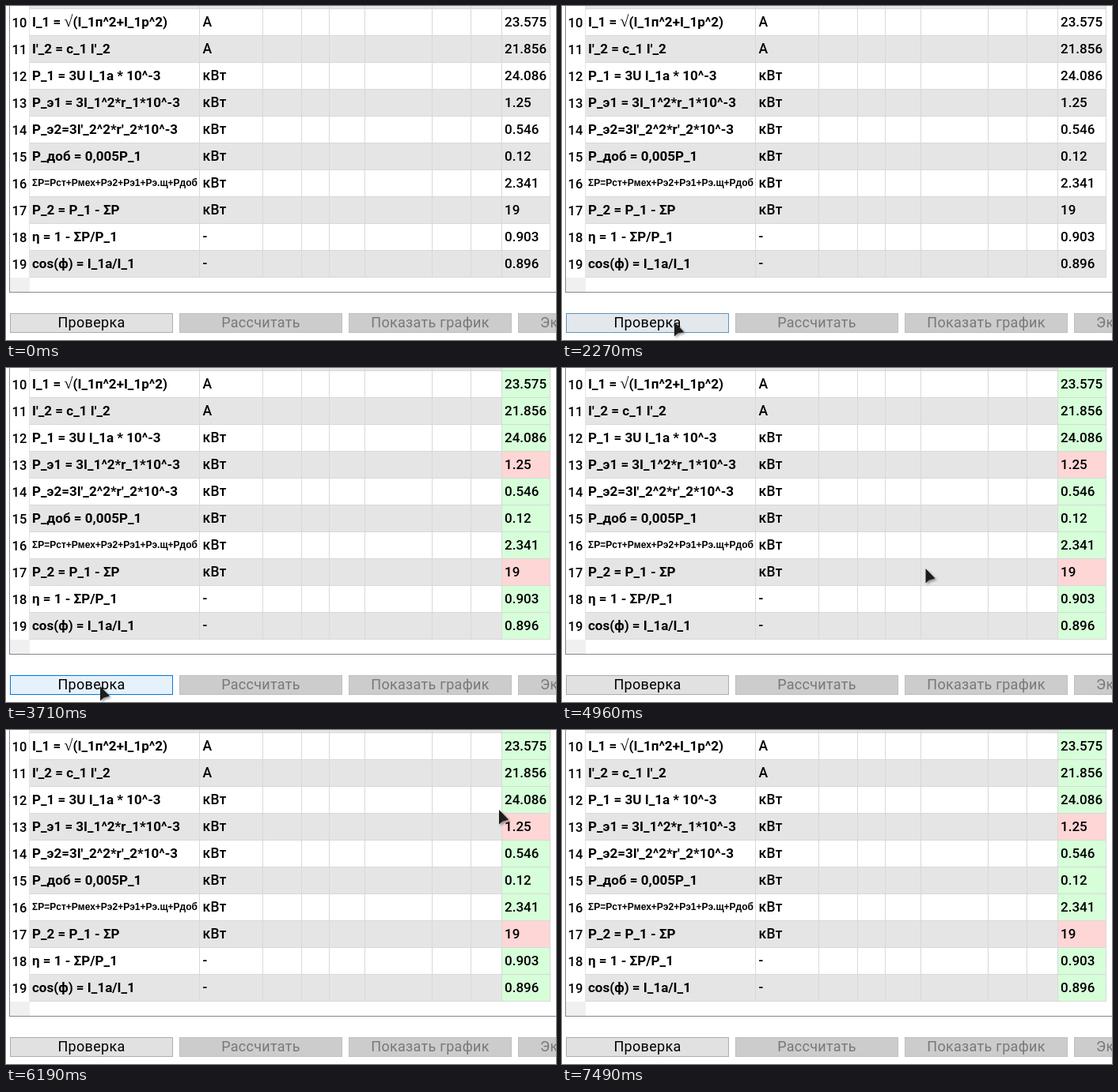
Write an HTML page that moves like this. It is 695 px wide and 423 px high and loops after 8950 ms.

```html
<!DOCTYPE html>
<html lang="ru">
<head>
<meta charset="utf-8">
<style>
html, body { margin: 0; width: 100%; height: 100%; overflow: hidden; background: #fff; }
svg { display: block; width: 695px; height: 423px; }
text { font: 18px Roboto, "Open Sans", sans-serif; white-space: pre; }
.num { font-size: 16.5px; font-weight: 500; text-anchor: middle; }
.formula { font-size: 17px; font-weight: 700; }
.small { font: 700 12px "Liberation Sans", Arial, sans-serif; }
.root { font: 400 20px "Liberation Serif", "DejaVu Sans", serif; }
.unit { font-size: 17.5px; font-weight: 500; letter-spacing: .3px; }
.label { letter-spacing: .3px; }
.value { font-size: 17px; font-weight: 500; }
.mid { text-anchor: middle; }
#cursor { filter: drop-shadow(2px 2px 1.5px rgba(0, 0, 0, .4)); }
</style>
</head>
<body>
<svg id="stage" viewBox="0 0 695 423"></svg>
<script>
const LOOP = 8950, ROW = 34;
const GRID = '#d8d8d8', GREY = '#e5e5e5', GREEN = '#d6ffd9', RED = '#ffd6d6';
const stage = document.getElementById('stage');

function add(tag, attrs, content = '') {
  const el = document.createElementNS('http://www.w3.org/2000/svg', tag);
  for (const key in attrs) el.setAttribute(key, attrs[key]);
  el.innerHTML = content;
  return stage.appendChild(el);
}
const rect = (x, y, width, height, fill) => add('rect', { x, y, width, height, fill });
const text = (x, y, cls, content, fill = '#000') => add('text', { x, y, class: cls, fill }, content);

// Formula, unit, value, wrong answer
const rows = [
  ['I_1 = <tspan class="root">√</tspan>(I_1п^2+I_1р^2)', 'А', '23.575'],
  ["I'_2 = c_1 I'_2", 'А', '21.856'],
  ['P_1 = 3U I_1a * 10^-3', 'кВт', '24.086'],
  ['P_э1 = 3I_1^2*r_1*10^-3', 'кВт', '1.25', true],
  ["P_э2=3I'_2^2*r'_2*10^-3", 'кВт', '0.546'],
  ['P_доб = 0,005P_1', 'кВт', '0.12'],
  ['ΣP=Pст+Pмех+Pэ2+Pэ1+Pэ.щ+Pдоб', 'кВт', '2.341'],
  ['P_2 = P_1 - ΣP', 'кВт', '19', true],
  ['η = 1 - ΣP/P_1', '-', '0.903'],
  ['cos(ϕ) = I_1a/I_1', '-', '0.896'],
];

// Table: fills, then grid, then text
rect(30, 0, 658, 3, GREY);
const marks = [rect(627, 0, 60, 3, GREEN)];
rows.forEach(([, , , wrong], i) => {
  const y = 4 + ROW * i;
  if (i % 2) rect(30, y, 658, ROW, GREY);
  marks.push(rect(627, y, 60, ROW, wrong ? RED : GREEN));
});
for (let i = 0; i <= rows.length; i++) rect(30, 3 + ROW * i, 658, 1, GRID);
for (const x of [244, 324, 373, 408, 453, 538, 587, 626, 687]) rect(x, 0, 1, 344, GRID);
rect(29, 0, 1, 344, GREY);
rect(5, 344, 25, 18, '#f0f0f0');
rect(4, 0, 1, 363, '#828790');
rect(4, 362, 691, 1, '#828790');
rows.forEach(([formula, unit, value], i) => {
  const y = 26 + ROW * i, small = formula.startsWith('ΣP=');
  text(17, y + 1, 'num', 10 + i);
  text(33, small ? y - 2 : y, small ? 'small' : 'formula', formula);
  text(248.5, y, 'unit', unit);
  text(630, y, 'value', value);
});

// Buttons, the last one cut off by the stage
const boxes = ['Проверка', 'Рассчитать', 'Показать график', 'Экспорт'].map((label, i) => {
  const x = 5 + 214 * i, cut = i === 3;
  const box = add('rect', { x: x + .5, y: 389.5, width: 205, height: 24, fill: '#ccc', stroke: '#bfbfbf' });
  text(x + (cut ? 28 : 103), 407, cut ? 'label' : 'label mid', label, i ? '#787878' : '#000');
  return box;
});

const cursor = add('path', { id: 'cursor', d: 'M0 0V18.5L4.5 14.5 12 12.5Z', fill: '#1c1c1c' });

// One clockwise turn from the top, as timed points
const turn = (start, quarter, cx, cy) => [0, 1, 2, 3, 4].map(k =>
  [start + quarter * k, cx + 44 * Math.sin(k * Math.PI / 2), cy - 18 * Math.cos(k * Math.PI / 2)]);

// Pointer: time, x, y. To the button, around both wrong answers, out below
const path = [
  [860, 655, 0], [1180, 450, 127], [1700, 267, 253], [2270, 142, 400], [2500, 119, 403],
  [4570, 119, 403], [4960, 459, 254],
  ...turn(5410, 130, 635, 269),
  ...turn(6190, 150, 623, 119),
  [7220, 609, 294], [7490, 505, 430],
];

// Smooth curve through the points that never overshoots them
function pointer(t) {
  const last = path.length - 1;
  const i = path.findIndex((p, k) => k === last - 1 || t < path[k + 1][0]);
  const span = path[i + 1][0] - path[i][0], u = (t - path[i][0]) / span;
  return [1, 2].map(axis => {
    const rate = k => (path[k + 1][axis] - path[k][axis]) / (path[k + 1][0] - path[k][0]);
    const slope = k => {
      const a = rate(Math.max(0, k - 1)), b = rate(Math.min(last - 1, k));
      return a * b > 0 ? 2 * a * b / (a + b) * span : 0;
    };
    const from = path[i][axis], to = path[i + 1][axis];
    return from + (to - from) * u * u * (3 - 2 * u)
      + slope(i) * u * (1 - u) ** 2 - slope(i + 1) * u * u * (1 - u);
  });
}

const fade = (t, start, length) => Math.max(0, Math.min(1, (t - start) / length));
const mix = (a, b, u) => a.map((v, i) => v + (b[i] - v) * u);
const rgb = c => `rgb(${c.map(Math.round)})`;
const show = (el, on) => el.setAttribute('visibility', on ? 'visible' : 'hidden');

function draw(t) {
  const active = t >= 860 && t < 7490;
  show(cursor, active);
  if (active) cursor.setAttribute('transform', `translate(${pointer(t).map(v => v.toFixed(1))})`);

  const hover = fade(t, 2180, 200) - fade(t, 4660, 180);
  const press = fade(t, 3390, 100) - fade(t, 3520, 190);
  const state = (idle, over, down) => rgb(mix(mix(idle, over, hover), down, press));
  boxes[0].setAttribute('fill', state([225, 225, 225], [229, 241, 251], [204, 228, 247]));
  boxes[0].setAttribute('stroke', state([173, 173, 173], [0, 120, 215], [0, 84, 153]));
  for (const mark of marks) show(mark, t >= 3520);
}

const begin = performance.now();
function tick() {
  draw((performance.now() - begin) % LOOP);
  requestAnimationFrame(tick);
}
tick();
</script>
</body>
</html>
```
